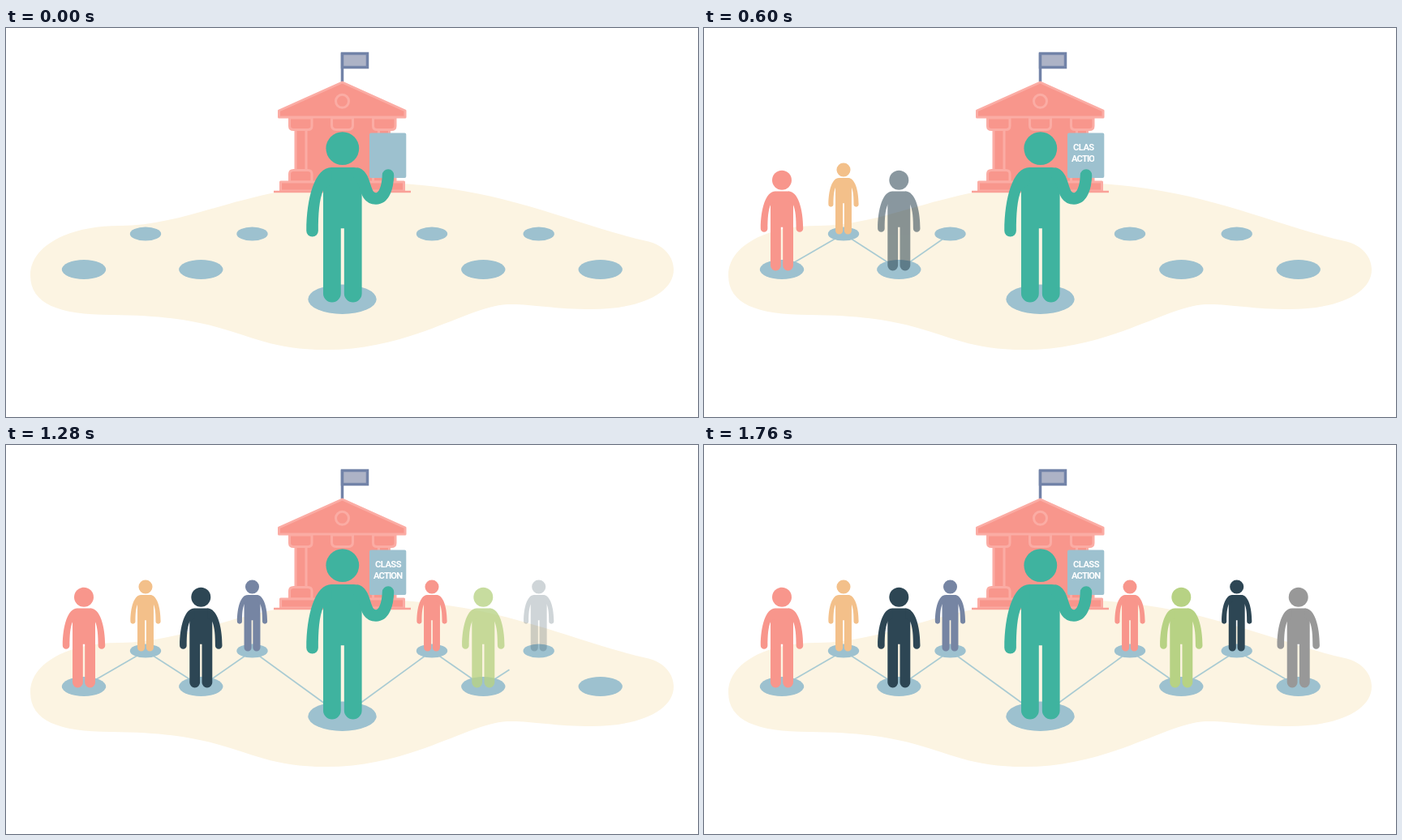
Animation of 853x480 px, one loop 2000 ms. Source, as an HTML page:

```html
<!DOCTYPE html>
<html lang="en">
<head>
<meta charset="utf-8">
<title>Class action</title>
<style>
  html, body { margin: 0; width: 100%; height: 100%; overflow: hidden; background: #fff; }
  svg { display: block; width: 100%; height: 100%; }
  .label { font: bold 11.2px Roboto, "Liberation Sans", sans-serif; fill: #fff; }
  .trim { fill: #f8968c; stroke: #fbaca4; stroke-width: 3; stroke-linejoin: round; }
  .disc, .paper { fill: #9dc1cf; }
  .link { stroke: #a9cbd3; stroke-width: 1.7; }
</style>
</head>
<body>
<svg viewBox="0 0 853 480">
  <defs>
    <!-- Feet at the origin, 124 units tall -->
    <g id="torso">
      <circle cy="-112" r="12"/>
      <path d="M-8-98.2H8Q14-98 14-88V-6.7a6.4 6.4 0 0 1-12.8 0V-54H-1.2V-6.7a6.4 6.4 0 0 1-12.8 0V-90Z"/>
    </g>
    <path id="arm" d="M-8-98.2C-20-98.2-26.2-76-26.2-52.2a4.3 4.3 0 0 0 8.6 0C-17.6-64-17-75-13.8-82L-8-86Z"/>
    <g id="person">
      <use href="#torso"/>
      <use href="#arm"/>
      <use href="#arm" transform="scale(-1 1)"/>
    </g>
    <g id="column">
      <path class="trim" d="M357 112H370V190H357Z"/>
      <path class="trim" d="M349.500 111H377V121Q377 125.500 372 125.500H354.500Q349.500 125.500 349.500 121Z"/>
      <path class="trim" d="M349.500 190V180Q349.500 175.500 354.500 175.500H372Q377 175.500 377 180V190Z"/>
    </g>
    <clipPath id="wipe"><rect id="wipeBox" x="448" y="135" width="0" height="40"/></clipPath>
  </defs>

  <path fill="#fcf4e2" d="M30 305C30 270 75 244 140 244C232 244 296 192 450 191C600 191 690 240 790 263C812 268 823 283 823 298C823 328 780 347 722 347C675 347 645 340 618 341C570 343 500 397 395 397C290 397 290 355 130 354C64 354 30 340 30 305Z"/>

  <g id="court">
    <path d="M414.500 66V31" stroke="#7283a8" stroke-width="3.500"/>
    <rect x="414.500" y="31.500" width="31" height="17" fill="#adb3c6" stroke="#7283a8" stroke-width="3.500"/>
    <path fill="#f8968c" d="M356 110H474V190H356Z"/>
    <use href="#column"/>
    <use href="#column" transform="translate(829.500 0) scale(-1 1)"/>
    <path class="trim" d="M401.500 111V120Q401.500 125.500 407 125.500H422Q427.500 125.500 427.500 120V111Z"/>
    <path class="trim" d="M336.500 102L414.500 67L492 102V110H336.500Z"/>
    <circle class="trim" cx="414.500" cy="90.300" r="8"/>
    <path class="trim" d="M338.500 190H490.500V201H338.500Z"/>
    <path d="M330 202H499" stroke="#f9a198" stroke-width="2.600"/>
  </g>

  <g id="links"></g>
  <g id="discs"></g>
  <g id="people"></g>

  <rect class="paper" x="448" y="129.500" width="45.300" height="55.500" rx="2"/>
  <g clip-path="url(#wipe)">
    <text class="label" x="455" y="150.800" letter-spacing="-0.550">CLASS</text>
    <text class="label" x="453" y="165.300" letter-spacing="-0.850">ACTION</text>
  </g>

  <g fill="#3fb39f">
    <g transform="translate(414.800 339) scale(1.700)">
      <use href="#torso"/>
      <use href="#arm"/>
    </g>
    <path d="M433 179.500C445 185 440 210.500 456 210.500C466 210.500 470.500 197 471 181.500" fill="none" stroke="#3fb39f" stroke-width="14.500" stroke-linecap="round"/>
  </g>
</svg>
<script>
const LOOP = 2000, TICK = 40, LAST = 1760;
const STAGGER = 200, FADE = 360, DRAW = 170;
const FRONT = { y: 298, rx: 27.2, ry: 12, scale: 1, foot: 299.7 };
const BACK = { y: 254, rx: 19.2, ry: 8.6, scale: 0.711, foot: 254.7 };
const LEAD = { x: 414.5, y: 334.7, rx: 42.2, ry: 18.2 };

const members = [
  [96, FRONT, '#f8968c'], [172, BACK, '#f3c08a'],
  [240.3, FRONT, '#2d4654'], [303.5, BACK, '#7685a3'],
  [525, BACK, '#f8968c'], [588.3, FRONT, '#b7d284'],
  [656.7, BACK, '#2d4654'], [732.7, FRONT, '#989898']
].map(([x, row, color]) => ({ x, color, ...row }));

const stops = [...members.slice(0, 4), LEAD, ...members.slice(4)];

function add(parent, tag, attrs) {
  const el = document.createElementNS('http://www.w3.org/2000/svg', tag);
  for (const key in attrs) el.setAttribute(key, attrs[key]);
  document.getElementById(parent).append(el);
  return el;
}

for (const { x, y, rx, ry } of stops) {
  add('discs', 'ellipse', { class: 'disc', cx: x, cy: y, rx, ry });
}

const people = members.map(m => add('people', 'use', {
  href: '#person', fill: m.color, opacity: 0,
  transform: `translate(${m.x} ${m.foot}) scale(${m.scale})`
}));

const links = stops.slice(1).map((to, i) => {
  const from = stops[i];
  const el = add('links', 'line', { class: 'link', x1: from.x, y1: from.y, x2: from.x, y2: from.y });
  return { el, from, to };
});

const wipeBox = document.getElementById('wipeBox');
const progress = (t, i, span) => Math.min(1, Math.max(0, (t - i * STAGGER) / span));
const mix = (a, b, p) => a + (b - a) * p;

function draw(t) {
  people.forEach((el, i) => el.setAttribute('opacity', progress(t, i, FADE)));
  links.forEach(({ el, from, to }, i) => {
    const p = progress(t, i, DRAW);
    el.setAttribute('x2', mix(from.x, to.x, p));
    el.setAttribute('y2', mix(from.y, to.y, p));
    el.setAttribute('visibility', p > 0 ? 'visible' : 'hidden');
  });
  wipeBox.setAttribute('width', Math.min(45, t === 0 ? 0 : 6 + t * 0.045));
}

const start = performance.now();
function frame() {
  const t = (performance.now() - start) % LOOP;
  draw(Math.min(LAST, Math.floor(t / TICK) * TICK));
  requestAnimationFrame(frame);
}
frame();
</script>
</body>
</html>
```
